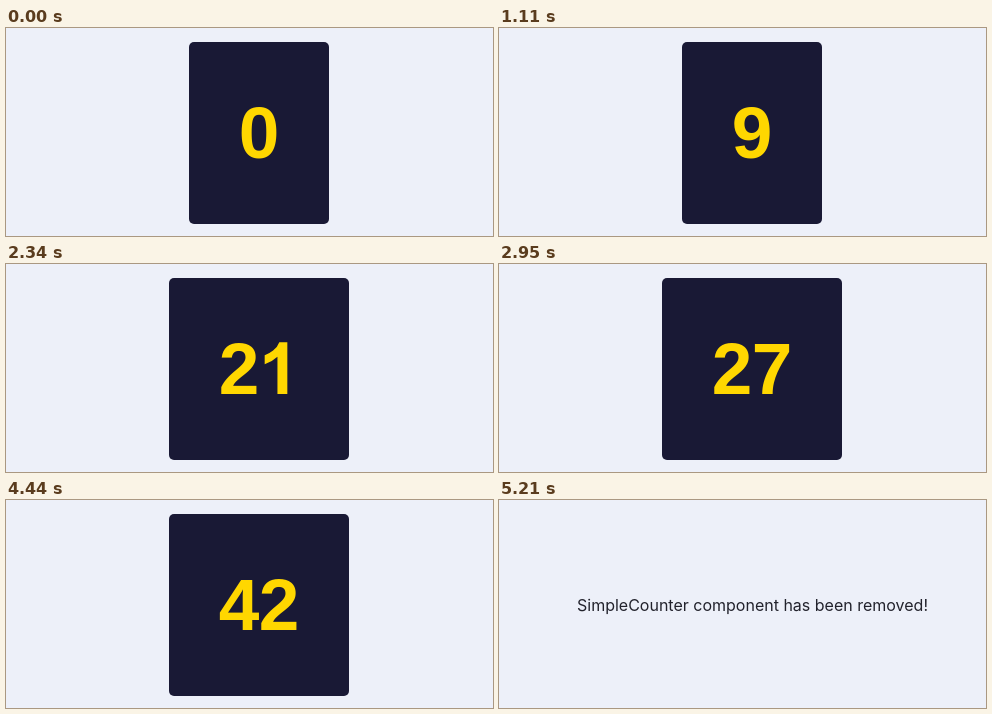
Write an HTML page that moves like this. It is 487 px wide and 208 px high and loops after 5.76 s.

```html
<!DOCTYPE html>
<html lang="en">
<head>
<meta charset="utf-8">
<title>Counter</title>
<style>
  html, body { margin: 0; width: 100%; height: 100%; overflow: hidden; background: #edf0f9; }
  svg { display: block; width: 487px; height: 208px; }
  .card { fill: #191935; }
  .digits { fill: #ffd700; font: bold 73px "Liberation Sans", Arial, sans-serif; text-anchor: middle; }
  .note { fill: #22222c; font: 400 16px Inter, sans-serif; text-anchor: middle; }
</style>
</head>
<body>
<svg viewBox="0 0 487 208">
  <defs>
    <!-- a "1" without a foot -->
    <path id="one" d="M806 0H525V-1059Q371-915 162-846V-1101Q272-1137 401-1237T578-1472H806Z"
      transform="scale(.03516) translate(-569 0)"/>
  </defs>
  <g id="counter">
    <rect class="card" id="card" y="14" height="182" rx="5"/>
    <g class="digits" id="digits"></g>
  </g>
  <text class="note" id="note" x="253.5" y="111">SimpleCounter component has been removed!</text>
</svg>
<script>
const LOOP = 5760, END = 5210;
const CENTER = 253, BASELINE = 130, ADVANCE = 40, PAD = 50;
const WARMUP = 775, SLOW_TICKS = [100, 330, 630];
const REFRESH = 77.7, TICK = 100, TICK_OFFSET = 177;

const byId = id => document.getElementById(id);
const counter = byId("counter"), card = byId("card"), digits = byId("digits"), note = byId("note");

// A few slow ticks, then a steady count seen through a slightly faster refresh
function valueAt(t) {
  if (t < WARMUP) return SLOW_TICKS.filter(tick => t >= tick).length;
  const refreshed = Math.floor((t + 2) / REFRESH) * REFRESH;
  return Math.floor((refreshed - TICK_OFFSET) / TICK);
}

function digitMarkup(d, x) {
  return d === "1"
    ? `<use href="#one" transform="translate(${x} ${BASELINE})"/>`
    : `<text x="${x}" y="${BASELINE}">${d}</text>`;
}

function drawCounter(value) {
  const chars = [...String(value)];
  const width = chars.length * ADVANCE;
  const left = CENTER - width / 2;
  card.setAttribute("x", left - PAD);
  card.setAttribute("width", width + 2 * PAD);
  digits.innerHTML = chars.map((d, i) => digitMarkup(d, left + (i + 0.5) * ADVANCE)).join("");
}

let shown;
function draw(t) {
  const removed = t >= END;
  counter.style.display = removed ? "none" : "";
  note.style.display = removed ? "" : "none";
  const value = valueAt(t);
  if (removed || value === shown) return;
  shown = value;
  drawCounter(value);
}

const start = performance.now();
function frame(now) {
  draw(Math.max(0, now - start) % LOOP);
  requestAnimationFrame(frame);
}
frame(start);
</script>
</body>
</html>
```
